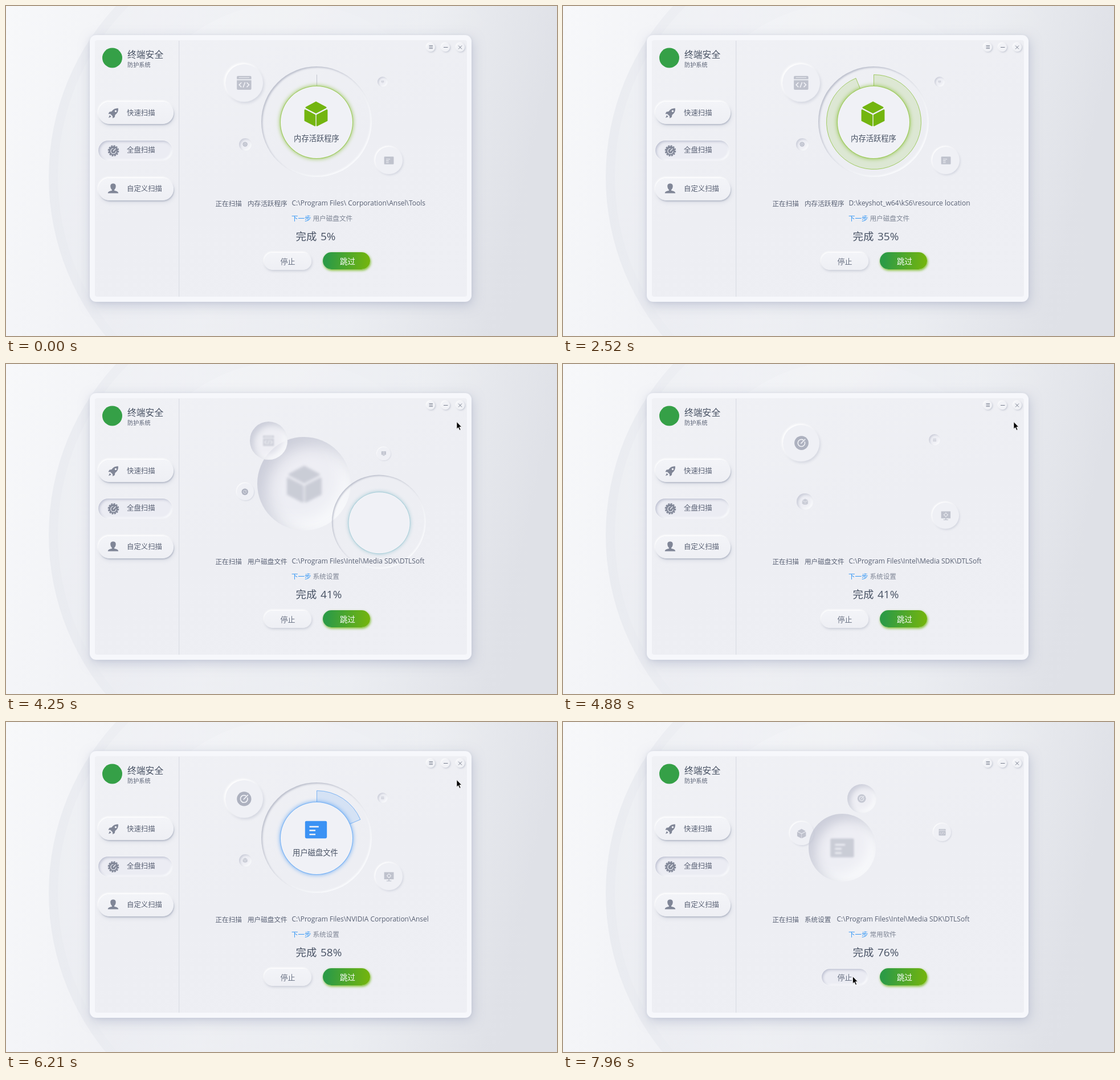
These frames come from a looping animation (967 px wide and 579 px high, 8000 ms). An HTML page:

```html
<!DOCTYPE html>
<html lang="zh-CN">
<head>
<meta charset="utf-8">
<title>终端安全</title>
<style>
html, body { margin: 0; width: 100%; height: 100%; overflow: hidden; background: #eceef3; }
#stage { position: absolute; left: 0; top: 0; width: 967px; height: 579px; overflow: hidden; }
#stage div, #stage svg { position: absolute; box-sizing: border-box; }
.layer { left: 0; top: 0; width: 967px; height: 579px; }
.window { left: 147px; top: 51px; width: 670px; height: 468px; border-radius: 11px; background: #f6f7fb;
  box-shadow: 2px 6px 20px rgba(160,167,192,.5), 0 1px 5px rgba(160,167,195,.2); }
.panel { left: 156px; top: 60px; width: 653px; height: 450px; border-radius: 4px;
  background: linear-gradient(160deg, #f0f1f5, #edeef3 50%, #eeeff4); }
.divider { left: 303px; top: 61px; width: 2px; height: 449px; background: #dcdee5; border-right: 1px solid #e8eaef; }
.pill { border-radius: 30px; }
.pill.up { background: linear-gradient(#f3f4f8, #eeeff4);
  box-shadow: -1px -2px 3px #fff, 1px 2px 2px rgba(165,170,187,.65), 2px 4px 6px rgba(180,185,203,.3); }
.pill.down { background: #ebecf3;
  box-shadow: inset 2px 2px 4px rgba(160,165,188,.6), inset -2px -2px 3px #fafbfd, 0 0 2px #fff; }
#stop.up { box-shadow: -1px -2px 3px #fff, 1px 2px 4px rgba(170,175,192,.55); }
#skip { left: 556px; top: 432px; width: 83px; height: 30px; background: linear-gradient(95deg, #2d9b45 10%, #72b40f 95%);
  box-shadow: 1px 2px 4px rgba(112,184,20,.9); }
.control { width: 15px; height: 15px; top: 65px; border-radius: 50%; background: #f1f2f6;
  box-shadow: -1px -1px 2px #fff, 1px 1px 3px rgba(165,170,187,.65); }
#nodes { isolation: isolate; }
.node { width: 1em; height: 1em; border-radius: 50%; }
.node.up { background: #eff0f5; box-shadow: -.03em -.03em .06em #fff, .03em .04em .07em rgba(175,180,198,.4); }
.node.down { z-index: 1; background: rgba(238,239,245,.6);
  box-shadow: inset .1em .09em .16em rgba(165,170,188,.48), inset -.1em -.1em .16em #f8f9fb; }
.node.small { z-index: 2; }
.node svg { left: .29em; top: .29em; width: .42em; height: .42em; }
.node.down svg { opacity: .75; filter: blur(.012em); }
.node.small svg { left: .34em; top: .34em; width: .32em; height: .32em; opacity: .6; }
#ring { left: 447.5px; top: 105.5px; width: 194px; height: 194px; }
#ring .groove { inset: 0; border-radius: 50%;
  box-shadow: inset 2px 2px 3px rgba(155,160,178,.6), inset -2px -2px 3px #fafbfd; }
#ring .sector { left: 0; top: 0; width: 194px; height: 194px; }
#ring .disc { left: 33.5px; top: 34.5px; width: 128px; height: 128px; border-radius: 50%; background: #f0f1f6;
  border: 1px solid rgba(var(--tint), .65); box-shadow: 0 0 7px rgba(var(--tint), .75), inset 0 0 2px #fff; }
#ring .emblem { left: 73.5px; top: 60.5px; width: 46px; height: 46px; }
text { font-family: "Noto Sans CJK SC", "Noto Sans CJK", sans-serif; fill: #596174; }
text.latin { font-family: "Open Sans", "Noto Sans", sans-serif; }
</style>
</head>
<body>
<div id="stage">
  <svg class="layer" viewBox="0 0 967 579">
    <defs>
      <linearGradient id="base" x2="1" y2=".15">
        <stop offset="0" stop-color="#f7f8fa"/><stop offset=".35" stop-color="#f0f1f5"/>
        <stop offset=".75" stop-color="#eceef2"/><stop offset="1" stop-color="#dfe1e7"/>
      </linearGradient>
      <linearGradient id="fade">
        <stop offset="0" stop-color="#dfe2e9" stop-opacity=".5"/><stop offset=".3" stop-color="#e6e8ee" stop-opacity=".25"/>
        <stop offset="1" stop-color="#e6e8ee" stop-opacity="0"/>
      </linearGradient>
      <linearGradient id="shine" x2=".8" y2=".6">
        <stop offset="0" stop-color="#fff" stop-opacity=".22"/><stop offset=".9" stop-color="#fff" stop-opacity="0"/>
      </linearGradient>
    </defs>
    <rect width="967" height="579" fill="url(#base)"/>
    <circle cx="515" cy="300" r="440" fill="url(#fade)"/>
    <circle cx="515" cy="300" r="424" fill="url(#shine)"/>
    <circle cx="499" cy="290" r="296" fill="url(#shine)"/>
  </svg>
  <div class="window"></div>
  <div class="panel"></div>
  <div class="divider"></div>
  <div class="pill up" style="left:162px;top:168px;width:132px;height:39px"></div>
  <div class="pill down" style="left:162px;top:236px;width:130px;height:35px"></div>
  <div class="pill up" style="left:162px;top:302px;width:132px;height:39px"></div>
  <div class="control" style="left:738px"></div>
  <div class="control" style="left:764px"></div>
  <div class="control" style="left:790px"></div>
  <div id="stop" class="pill"></div>
  <div id="skip" class="pill"></div>
  <div id="nodes"></div>
  <div id="ring">
    <div class="groove"></div>
    <svg class="sector" viewBox="-97.5 -97.5 194 194"><path id="sweep"/></svg>
    <div class="disc"></div>
    <svg class="emblem" id="emblem" viewBox="0 0 24 24"></svg>
  </div>
  <svg class="layer" id="overlay" viewBox="0 0 967 579">
    <clipPath id="lineClip"><rect x="475" y="335" width="320" height="23"/></clipPath>
    <circle cx="186.5" cy="91" r="17.5" fill="#35a047"/>
    <g stroke="#777e8e" fill="none">
      <path d="M742.5 69.5h6.5M742.5 72h6.5M742.5 74.5h6.5M768 72.5h7.5M794 69.5l6 6M800 69.5l-6 6"/>
    </g>
    <g fill="#808697">
      <path d="M197 179.5c-6-.2-9 2-11.5 5.5l-4 .8-2 3.5 3.8.2 3.7 3.7.3 3.8 3.5-2 .7-4c3.7-2.5 5.7-5.5 5.5-11.5zM182 191.5l2.8 2.8-4.8 2z"/>
      <circle cx="192.5" cy="184.5" r="1.7" fill="#eff0f5"/>
      <circle cx="188.5" cy="254" r="8"/>
      <circle cx="188.5" cy="254" r="8.8" fill="none" stroke="#808697" stroke-width="2" stroke-dasharray="3 1.6"/>
      <circle cx="188.5" cy="254.5" r="4.6" fill="none" stroke="#e8eaf1" stroke-width="1.3" stroke-dasharray="21 8"/>
      <path d="M188 255l4.5-5" stroke="#e8eaf1" stroke-width="1.4"/>
      <path d="M188 311.5c3.5 0 5 2.2 4.7 5.3-.2 2.7-1.5 4.7-2.7 5.7l.2 1.500c4 .8 7 1.500 7 4.500h-18.400c0-3 3-3.700 7-4.500l.2-1.500c-1.200-1-2.500-3-2.700-5.700-.3-3.100 1.200-5.300 4.700-5.300z"/>
    </g>
  </svg>
</div>
<script>
const LOOP = 8000;
const $ = id => document.getElementById(id);
const clamp = x => Math.min(1, Math.max(0, x));
const mix = (a, b, p) => a + (b - a) * p;
const smooth = x => x * x * (3 - 2 * x);

const line = (d, w) => `<path d="${d}" fill="none" stroke="#f0f1f6" stroke-width="${w}"/>`;
const icons = {
  cube: `<path d="M12 1.5 21 6.3 12 11 3 6.3ZM2 8.7 11 13.3V22.8L2 18.2ZM22 8.7 13 13.3V22.8L22 18.2Z"
    fill="currentColor" stroke="currentColor" stroke-width="1.3" stroke-linejoin="round"/>`,
  card: `<rect x="2" y="4" width="20" height="16" rx="1.3" fill="currentColor"/>` +
    line('M6 9.3h8.5M6 12.7h5.5M6 16.3h5.5', 1.3),
  screen: `<path d="M2 3h20v15h-9v2.5h4V22H7v-1.5h4V18H2z" fill="currentColor"/>` +
    line('M12 7.2a3.3 3.3 0 1 0 .1 0M12 5.5v2M12 13.5v2M7 10.5h2M15 10.5h2', 1.2),
  code: `<path d="M1 3q0-1.5 1.5-1.5h19Q23 1.5 23 3v3.5H1zM1 8h22v13q0 1.5-1.5 1.5h-19Q1 22.5 1 21z" fill="currentColor"/>` +
    line('M4 4h16', .8) + line('M8 11.5l-3.5 3.5 3.5 3.5M16 11.5l3.5 3.5-3.5 3.5M13.5 11l-3 8', 1.4),
  gauge: `<circle cx="12" cy="12" r="11" fill="currentColor"/>` +
    line('M15 7.5A5.5 5.5 0 1 0 17 10M11 13l7-7', 1.5)
};

// Stations in travel order: x, y, diameter, diameter when leaving, surface
const stations = [
  [661, 133, 18, 18, 'down small'], [672, 271, 48, 48, 'up'], [545, 203, 194, 194, ''],
  [420, 243, 22, 22, 'down'], [418, 135, 66, 77, 'up']
];
const nodes = ['screen', 'card', 'cube', 'gauge', 'code'].map((name, home) => {
  const el = document.createElement('div');
  el.innerHTML = `<svg viewBox="0 0 24 24">${icons[name]}</svg>`;
  el.style.color = name === 'gauge' ? '#adb1bf' : '#bfc2cd';
  $('nodes').append(el);
  return { el, home };
});

const tasks = ['内存活跃程序', '用户磁盘文件', '系统设置', '常用软件'];
const stageStart = [0, 4110, 7610];
const themes = [
  { tint: '115,181,16', icon: 'cube', start: 72, span: 3260, labelX: 545, labelY: 237 },
  { tint: '59,146,244', icon: 'card', start: 6105, span: 1083, labelX: 543, labelY: 233.5 }
];
const files = 'C:\\Program Files\\';
const media = files + 'Intel\\Media SDK\\DTLSoft';
const ansel = files + 'NVIDIA Corporation\\Ansel';
const wrapped = [files + 'NVIDIA', 'Corporation\\ D'];
// Time, percent, first and second line of the path
const scans = [
  [0, 5, files + ' Corporation\\Ansel\\Tools'], [630, 12, ...wrapped], [1400, 18, media + '\\x64'],
  [1890, 27, ansel + '\\Tools'], [2380, 35, 'D:\\keyshot_w64\\kS6\\resource location'],
  [2940, 35, ...wrapped], [3570, 35, media], [4110, 41, media], [5320, 41, ...wrapped],
  [6020, 58, ansel], [6440, 66, ansel], [7610, 76, media]
];

function svg(tag, attrs, content = '') {
  const el = document.createElementNS('http://www.w3.org/2000/svg', tag);
  for (const key in attrs) el.setAttribute(key, attrs[key]);
  el.textContent = content;
  $('overlay').append(el);
  return el;
}
const label = (x, y, size, content, color = '#596174', extra = {}) =>
  svg('text', { x, y, 'font-size': size, style: `fill:${color}`, ...extra }, content);

label(213, 91, 15.8, '终端安全', '#485264');
label(213, 106.5, 10.2, '防护系统', '#596174');
label(212, 192, 12.4, '快速扫描');
label(212, 257, 12.4, '全盘扫描');
label(212, 324.5, 12.4, '自定义扫描');
label(367.5, 350.5, 11.6, '正在扫描');
label(501, 376.5, 11.5, '下一步', '#2f94f5');
label(508.5, 411, 18.4, '完成', '#485264');
label(481.5, 453, 13, '停止', '#6b7385');
label(586, 453, 13.4, '跳过', '#fff');
const latin = { class: 'latin' };
const task = label(424, 350.5, 11.6, '');
const next = label(538.5, 376.5, 11.6, '', '#7d8494');
const percent = label(552, 410.5, 19, '', '#485264', latin);
const paths = [350, 364].map(y => label(502, y, 12, '', '#596174', { ...latin, 'clip-path': 'url(#lineClip)' }));
const ringLabel = label(545, 237, 13.3, '', '#485264', { 'text-anchor': 'middle' });
const cursor = svg('path', {
  d: 'M0 0V12.5L2.8 9.9 5 14.8 7 13.9 4.9 9.1H8.7Z', fill: '#000', stroke: '#fff', 'stroke-width': .7
});

function drawNodes(stage, p) {
  for (const { el, home } of nodes) {
    const to = stations[(home + stage) % 5];
    const from = stations[(home + stage + 4) % 5];
    const size = mix(from[3], to[2], p);
    el.className = 'node ' + to[4];
    el.style.display = to[4] ? '' : 'none';
    el.style.fontSize = size + 'px';
    el.style.left = mix(from[0], to[0], p) - size / 2 + 'px';
    el.style.top = mix(from[1], to[1], p) - size / 2 + 'px';
  }
}

function sectorPath(turn) {
  const a = Math.min(turn, .9997) * 2 * Math.PI;
  const at = r => `${r * Math.sin(a)} ${-r * Math.cos(a)}`;
  const large = turn > .5 ? 1 : 0;
  return `M0 -62V-83A83 83 0 ${large} 1 ${at(83)}L${at(62)}A62 62 0 ${large} 0 0 -62Z`;
}

function drawRing(t, stage, since, p) {
  const leaving = stage > 0 && since < 840;
  const theme = themes[Math.min(stage, 1)];
  const opacity = leaving ? clamp(3 - 10 * p) : stage ? clamp((since - 840) / 500) : 1;
  const ring = $('ring');
  ring.style.opacity = opacity;
  ring.style.transform = leaving ? `translate(${620 * p}px,${420 * p}px) scale(${1 - .85 * p})` : '';
  ring.style.setProperty('--tint', leaving ? '135,190,203' : theme.tint);
  $('sweep').style.display = $('emblem').style.display = leaving ? 'none' : '';
  ringLabel.style.opacity = leaving ? 0 : opacity;
  if (leaving) return;
  const x = clamp((t - theme.start) / theme.span);
  const turn = x * (2 - x);
  $('sweep').setAttribute('d', sectorPath(turn));
  $('sweep').setAttribute('fill', `rgba(${theme.tint},.14)`);
  $('sweep').setAttribute('stroke', turn ? `rgba(${theme.tint},.6)` : 'rgba(150,156,170,.3)');
  $('emblem').style.color = `rgb(${theme.tint})`;
  if ($('emblem').dataset.icon !== theme.icon) {
    $('emblem').dataset.icon = theme.icon;
    $('emblem').innerHTML = icons[theme.icon];
  }
  ringLabel.textContent = tasks[stage];
  ringLabel.setAttribute('x', theme.labelX);
  ringLabel.setAttribute('y', theme.labelY);
}

function drawText(t, stage) {
  const [, value, ...lines] = scans.filter(scan => scan[0] <= t).pop();
  task.textContent = tasks[stage];
  next.textContent = tasks[stage + 1];
  percent.textContent = value + '%';
  paths.forEach((el, i) => {
    el.textContent = lines[i] || '';
    el.setAttribute('x', tasks[stage].length === 4 ? 480.5 : 501.5);
  });
}

function drawPointer(t) {
  const enter = smooth(clamp((t - 2940) / 560));
  const travel = smooth(clamp((t - 6700) / 1080));
  const x = mix(mix(778, 791, enter), 508.5, travel);
  const y = mix(mix(65, 101.5, enter), 446.5, travel);
  cursor.style.display = t < 2940 ? 'none' : '';
  cursor.setAttribute('transform', `translate(${x} ${y})`);
  const pressed = t >= 7820;
  $('stop').className = pressed ? 'pill down' : 'pill up';
  $('stop').style.cssText = pressed
    ? 'left:454px;top:433px;width:81px;height:29px'
    : 'left:453px;top:433px;width:83px;height:30px';
}

function render() {
  const t = performance.now() % LOOP;
  const stage = stageStart.filter(start => start <= t).length - 1;
  const since = t - stageStart[stage];
  const p = stage ? clamp(since / 800) : 1;
  drawNodes(stage, p);
  drawRing(t, stage, since, p);
  drawText(t, stage);
  drawPointer(t);
  requestAnimationFrame(render);
}
render();
</script>
</body>
</html>
```
